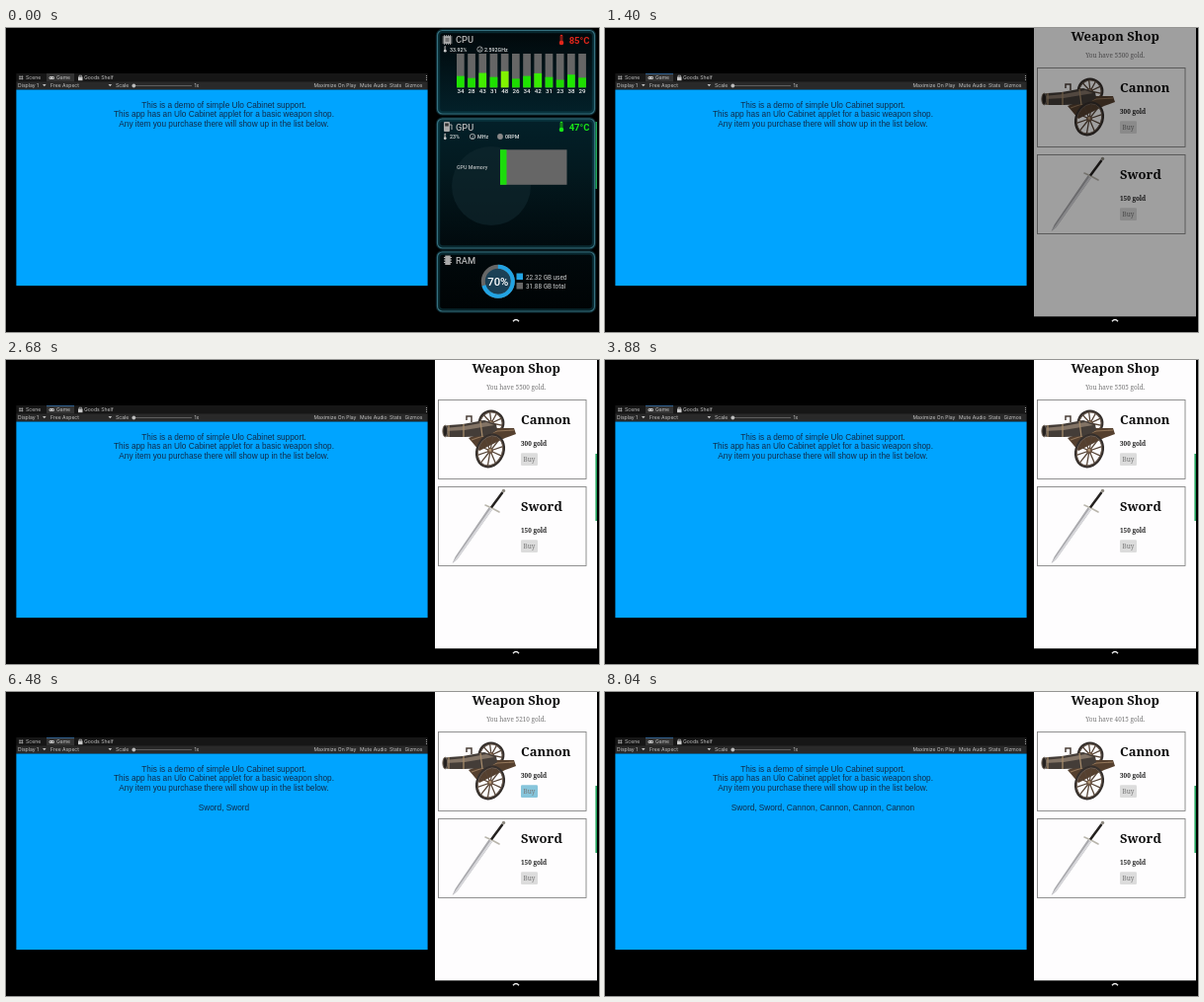
Recreate the animation shown at these times as an HTML page. Size 600 px wide and 308 px high, loop 8.08 s.

```html
<!DOCTYPE html>
<html lang="en">
<head>
<meta charset="utf-8">
<title>Weapon shop demo</title>
<style>
  html, body { margin: 0; width: 100%; height: 100%; overflow: hidden; background: #000; }
  svg { display: block; width: 600px; height: 308px; }
  text { white-space: pre; }
  .ui { font: 5.1px Inter, Roboto, sans-serif; fill: #c4c4c4; }
  .game { font: 8.25px "Liberation Sans", Arial, sans-serif; fill: #102b49; text-anchor: middle; }
  .stat { font: 500 5.3px Roboto, sans-serif; fill: #dedede; }
  .core { font: 500 6.2px Roboto, sans-serif; fill: #eee; }
  .head { font: 500 9.3px Roboto, sans-serif; fill: #b4b4b4; }
  .temp { font: bold 9.5px Roboto, sans-serif; text-anchor: end; }
  .shop { font: 6.4px "Noto Serif", serif; fill: #777; }
  .title { font: bold 13px "Noto Serif", serif; fill: #111; }
  .price { font: bold 6.4px "Noto Serif", serif; fill: #222; }
  .mid { text-anchor: middle; }
</style>
</head>
<body>
<svg id="stage" viewBox="0 0 600 308"></svg>
<script>
const LOOP = 8080;
const PRESS = 120;
const GREY = '#666';
const RED = '#e0261b';

const text = (x, y, cls, str, extra = '') => `<text x="${x}" y="${y}" class="${cls}" ${extra}>${str}</text>`;
const rect = (x, y, w, h, fill, extra = '') =>
  `<rect x="${x}" y="${y}" width="${w}" height="${h}" fill="${fill}" ${extra}/>`;
const circle = (x, y, r, fill, extra = '') => `<circle cx="${x}" cy="${y}" r="${r}" fill="${fill}" ${extra}/>`;
const line = (d, stroke, width = 1, extra = '') =>
  `<path d="${d}" fill="none" stroke="${stroke}" stroke-width="${width}" ${extra}/>`;
const shape = (d, fill, extra = '') => `<path d="${d}" fill="${fill}" ${extra}/>`;

function editor() {
  const arrow = x => shape(`M${x} 57h3.6l-1.8 2.3z`, '#c4c4c4');
  const labels = [[12, 'Display 1'], [45, 'Free Aspect'], [111, 'Scale'], [190.5, '1x'],
    [311.5, 'Maximize On Play'], [358, 'Mute Audio'], [388, 'Stats'], [403.5, 'Gizmos']];
  return rect(10.4, 46, 416.2, 8.5, '#161616') + rect(41, 46, 28, 8.5, '#333')
    + rect(41, 46, 28, .9, '#2f6699', 'id="focus"')
    + rect(10.4, 54.3, 416.2, 8.2, '#292929') + rect(10.4, 62.5, 416.2, 198.6, '#00a4ff')
    + line('M14 48.4v4M16.4 48.4v4M13.2 49.3h4.2M13.2 51.5h4.2', '#b5b5b5', .7)
    + rect(43.5, 49, 5.5, 3, '#c8c8c8', 'rx="1.5"') + circle(45, 50.5, .6, '#333') + circle(47.6, 50.5, .6, '#333')
    + rect(73, 49.5, 4.5, 3.7, '#c8c8c8') + line('M74 49.5v-1.3h2.5v1.3', '#c8c8c8', .7)
    + text(20, 52.3, 'ui', 'Scene') + text(51, 52.3, 'ui', 'Game') + text(79, 52.3, 'ui', 'Goods Shelf')
    + [48.5, 50.5, 52.5].map(y => circle(425.5, y, .6, '#bbb')).join('')
    + labels.map(([x, s]) => text(x, 60.2, 'ui', s)).join('')
    + arrow(37) + arrow(103.5)
    + line('M129 58.5H188', '#777', .7) + circle(129.3, 58.5, 1.9, '#bbb')
    + text(220.5, 81, 'game', 'This is a demo of simple Ulo Cabinet support.')
    + text(220.5, 90.4, 'game', 'This app has an Ulo Cabinet applet for a basic weapon shop.')
    + text(220.5, 99.8, 'game', 'Any item you purchase there will show up in the list below.')
    + text(220.5, 119.9, 'game', '', 'id="list"');
}

const panel = (y, h) =>
  rect(436.5, y, 159, h, 'none', 'rx="5" stroke="#113742" stroke-width="3.4" opacity=".6"')
  + rect(436.5, y, 159, h, 'url(#panel)', 'rx="5"')
  + rect(438, y + 1.5, 156, h - 3, 'none', 'rx="4" stroke="#0f4652" stroke-width="2.4" opacity=".5"')
  + rect(436.5, y, 159, h, 'none', 'rx="5" stroke="#35707f" stroke-width="1.2"');

const chip = (x, y) =>
  line([-3, -1, 1, 3].map(d => `M${x + d} ${y - 5}v10M${x - 5} ${y + d}h10`).join(''), '#aaa', .8)
  + rect(x - 3.7, y - 3.7, 7.4, 7.4, '#aaa') + rect(x - 2, y - 2, 4, 4, '#777');

const thermo = (x, y, color, s = 1) =>
  line(`M${x} ${y - 4 * s}v${5 * s}`, color, 2.6 * s, 'stroke-linecap="round"')
  + line(`M${x} ${y - 4 * s}v${5 * s}`, '#111', .9 * s)
  + circle(x, y + 3 * s, 2.3 * s, color);

const dial = (x, y) => circle(x, y, 2.7, 'none', 'stroke="#bbb" stroke-width=".8"')
  + line(`M${x} ${y}l1.4 -1.2M${x - 1.4} ${y + 1.3}h2.8`, '#bbb', .7);

const barX = i => 456 + i * 11.2;

function monitor() {
  let s = panel(2.5, 84.5) + panel(92, 131) + panel(227, 60)
    + circle(491, 160, 40, '#12292f', 'opacity=".6"')
    + chip(446.5, 12) + text(455, 15.4, 'head', 'CPU')
    + thermo(562, 12, RED) + text(590.5, 15.6, 'temp', '', `id="heat" fill="${RED}"`)
    + thermo(444.3, 21.4, '#ccc', .6) + text(449, 23.7, 'stat', '', 'id="load"')
    + dial(479.5, 21.6) + text(484, 23.7, 'stat', '2.592GHz');
  for (let i = 0; i < 12; i++) {
    s += rect(barX(i), 26, 7.7, 34.3, GREY) + rect(barX(i), 26, 7.7, 0, '#2d0', `id="bar${i}"`)
      + text(barX(i) + 3.9, 65.9, 'core mid', '', `id="num${i}"`);
  }
  s += rect(443, 95, 6, 10, '#aaa', 'rx="1"') + rect(444.2, 96.5, 3.6, 3, '#333')
    + line('M449 98h2v5', '#aaa', 1)
    + text(455, 103.8, 'head', 'GPU') + thermo(562, 100, '#19e619')
    + text(590.5, 104, 'temp', '47°C', 'fill="#19e619"')
    + thermo(444.3, 110, '#ccc', .6) + text(449, 112.2, 'stat', '', 'id="gpu"')
    + dial(472, 110) + text(477, 112.2, 'stat', 'MHz')
    + circle(500, 110, 2.9, '#888') + text(505, 112.2, 'stat', '0RPM')
    + text(456, 143, 'stat', 'GPU Memory', 'opacity=".8"')
    + rect(500, 123.3, 67.5, 35.5, GREY) + rect(500, 123.3, 6.5, 35.5, '#1bdc0b')
    + line('M443 232.5h8M443 235h8M443 237.5h8', '#aaa', 1) + rect(444.3, 230.5, 5.4, 9.5, '#aaa')
    + text(455, 239.4, 'head', 'RAM');
  const ring = 2 * Math.PI * 15;
  s += circle(497.8, 256.7, 15, '#1b4055', `stroke="${GREY}" stroke-width="4"`)
    + circle(497.8, 256.7, 15, 'none', `stroke="#21a3e3" stroke-width="4"
        stroke-dasharray="${ring * .7} ${ring}" transform="rotate(-90 497.8 256.7)"`)
    + text(497.8, 260.7, 'mid', '70%', 'fill="#fff" style="font:500 11.3px Roboto,sans-serif"')
    + rect(516.5, 248.5, 6.5, 6.5, '#21a3e3') + rect(516.5, 258, 6.5, 6.5, GREY)
    + [[254.6, '22.32 GB used'], [264, '31.88 GB total']]
      .map(([y, t]) => text(526, y, '', t, 'fill="#ccc" style="font:6.4px Roboto,sans-serif"')).join('');
  return s;
}

function wheel(x, y, rx, ry, tilt) {
  let spokes = '';
  for (let i = 0; i < 10; i++) {
    const a = i * Math.PI / 5;
    spokes += `M0 0L${(rx * Math.cos(a)).toFixed(1)} ${(ry * Math.sin(a)).toFixed(1)}`;
  }
  return `<g transform="translate(${x} ${y}) rotate(${tilt})">`
    + line(spokes, '#574537', 1.3)
    + `<ellipse rx="${rx}" ry="${ry}" fill="none" stroke="#352f2c" stroke-width="2.8"/>`
    + `<ellipse rx="${rx - .9}" ry="${ry - .9}" fill="none" stroke="#7d6a5a" stroke-width=".7"/>`
    + circle(0, 0, 3, '#6d5645') + circle(-.5, -.5, 1.4, '#b79b79') + '</g>';
}

const cannon = () => wheel(491, 64, 12, 12, -25)
  + shape('M468 79L494 69L514 69L516 75L505 79L479 92Z', '#55402f')
  + line('M471 81L497 72L514 71', '#93765a', 1.2)
  + shape('M443 67L448 66L462 65L484 61L496 65L497 71L488 77L464 78L448 78L443 77Z', '#443d38')
  + shape('M444 69L464 67L486 63L494 66L464 71L445 72Z', '#837466')
  + line('M448 66v12M463 65v13M480 62l2 16', '#a48a6b', 1.3)
  + '<ellipse cx="444.3" cy="72" rx="2.4" ry="5.8" fill="#25211f" stroke="#75685c"/>'
  + line('M466 61v-4h5v6', '#493e37', 1.5)
  + wheel(490, 92, 13, 16.5, 24);

const sword = () => shape('M451.6 206L454.8 199L488.5 149.5L491.8 152L456.5 202Z', '#a9a9ad')
  + shape('M452 205.5L490 151L491.8 152L456.5 202Z', '#d8d8dc')
  + line('M485 147Q492 150 499 154', '#b9b6ac', 1.6, 'stroke-linecap="round"')
  + line('M491 149.5L502.5 134', '#24211f', 2.5) + circle(503.5, 132.5, 1.7, '#8d8980');

function card(y, name, price, id) {
  return rect(437.5, y + .5, 149.5, 80, 'none', 'stroke="#858585" stroke-width=".9"')
    + text(521, y + 25, 'title', name) + text(521, y + 46.6, 'price', `${price} gold`)
    + rect(521, y + 54.3, 17, 12.7, '#dcdcdc', `rx="1.2" id="${id}"`)
    + text(529.5, y + 62.8, 'shop mid', 'Buy');
}

const shop = () => rect(434, 0, 164, 292.3, '#fefdfe')
  + text(516.2, 12.6, 'title mid', 'Weapon Shop') + text(516.2, 30, 'shop mid', '', 'id="gold"')
  + card(40, 'Cannon', 300, 'buyCannon') + card(128, 'Sword', 150, 'buySword')
  + cannon() + sword();

const stage = document.getElementById('stage');
stage.innerHTML = `<defs>
    <linearGradient id="panel" gradientUnits="userSpaceOnUse" x1="0" y1="0" x2="0" y2="290">
      <stop offset="0" stop-color="#010709"/><stop offset=".3" stop-color="#03212a"/>
      <stop offset=".5" stop-color="#03191f"/><stop offset=".78" stop-color="#01090c"/>
      <stop offset="1" stop-color="#000304"/></linearGradient></defs>`
  + rect(0, 0, 600, 308, '#000') + editor()
  + `<g id="monitor">${monitor()}</g><g id="shop">${shop()}</g>`
  + rect(596.4, 95, 1.6, 68, '#20a45c', 'id="handle"')
  + line('M513 297.2Q516 293.8 519 297.2', '#eee', 1.4);

const el = {};
stage.querySelectorAll('[id]').forEach(n => { el[n.id] = n; });
const set = (id, attrs) => { for (const k in attrs) el[id].setAttribute(k, attrs[k]); };
const write = (id, str) => { if (el[id].textContent !== str) el[id].textContent = str; };

const samples = [
  { from: 0, heat: 85, gpu: 23, cores: [34, 28, 43, 31, 48, 26, 34, 42, 31, 23, 38, 29] },
  { from: 600, heat: 77, gpu: 20, cores: [31, 28, 24, 24, 21, 24, 20, 68, 10, 17, 17, 46] },
];
const presses = [
  [4320, 'Sword'], [4680, 'Sword'],
  [6440, 'Cannon'], [6840, 'Cannon'], [7240, 'Cannon'], [7640, 'Cannon'],
];
const cost = { Sword: 150, Cannon: 300 };
const income = [3800, 5480, 7160];

const loadColor = v => `hsl(${v < 40 ? 112 : Math.max(57, 112 - (v - 40) * 3)} 100% ${Math.min(50, 38 + v / 5)}%)`;

function showSample({ heat, gpu, cores }) {
  write('heat', `${heat}°C`);
  write('gpu', `${gpu}%`);
  write('load', `${(cores.reduce((a, b) => a + b) / cores.length).toFixed(2)}%`);
  cores.forEach((v, i) => {
    const h = 34.3 * v / 100;
    set(`bar${i}`, { y: 60.3 - h, height: h, fill: loadColor(v) });
    write(`num${i}`, String(v));
  });
}

function render(t) {
  showSample(samples.filter(s => t >= s.from).pop());
  const fade = Math.min(1, Math.max(0, (t - 1250) / 240));
  set('monitor', { opacity: t < 1250 ? 1 : 0 });
  set('shop', { opacity: fade });
  set('focus', { opacity: t >= 1000 ? 1 : 0 });
  set('handle', { opacity: fade > 0 && fade < 1 ? 0 : 1 });

  const bought = presses.filter(([at]) => t >= at + PRESS).map(p => p[1]);
  const earned = 5 * income.filter(at => t >= at).length;
  write('gold', `You have ${bought.reduce((g, item) => g - cost[item], 5500 + earned)} gold.`);
  write('list', bought.join(', '));
  for (const item in cost) {
    const down = presses.some(([at, name]) => name === item && t >= at && t < at + PRESS);
    set('buy' + item, { fill: down ? '#86c5db' : '#dcdcdc' });
  }
}

function tick() {
  render(performance.now() % LOOP);
  requestAnimationFrame(tick);
}
tick();
</script>
</body>
</html>
```
